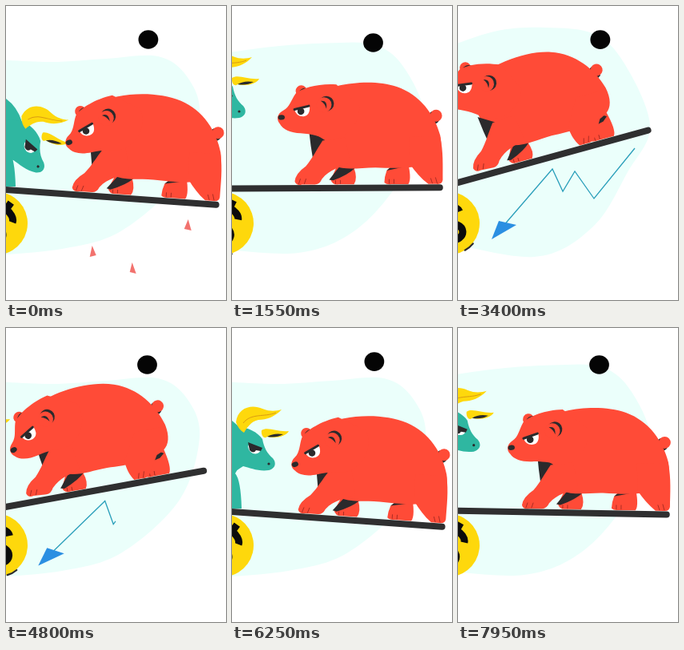
Recreate the animation shown at these times as an HTML page. Size 275 px wide and 368 px high, loop 8 s.

```html
<!DOCTYPE html>
<html lang="en">
<head>
<meta charset="utf-8">
<title>Bear and bull on a seesaw</title>
<style>
  html, body { margin: 0; width: 100%; height: 100%; overflow: hidden; background: #fff; }
  svg { display: block; width: 100vw; height: 100vh; }
  .red { fill: #ff4b37; }
  .ink { fill: #2b2a2c; }
  .teal { fill: #2fb7a1; }
  .gold { fill: #fed80c; }
  .line { fill: none; stroke: #2b2a2c; stroke-linecap: round; }
  .toe { fill: none; stroke: #a32a22; stroke-width: .9; stroke-linecap: round; }
</style>
</head>
<body>
<svg viewBox="0 0 275 368">
  <path id="blob" fill="#ebfffb"/>
  <ellipse id="dot" rx="12.4" ry="11.8" fill="#050505"/>

  <g id="chart">
    <path id="trend" d="M221 178L170 241L146 207L131 232L118 204L50 283" pathLength="1" fill="none" stroke="#2a9fba" stroke-width="1.3"/>
    <path id="tip" d="M42 292L51 269L73 274Z" fill="#2b8fe2"/>
  </g>
  <g id="sparks" fill="#f0504a">
    <path d="M107 300L112 312L104 314Z"/>
    <path d="M157 321L162 335L154 333Z"/>
    <path d="M227 267L231 281L222 279Z"/>
  </g>

  <g id="coin">
    <circle r="39.5" class="gold"/>
    <path class="line" stroke-width="9" d="M16-13C13-24-15-25-16-12C-16 3 17-4 17 12C17 26-14 25-17 13M0-32V-22M0 22V32" style="stroke:#0b0b0b;stroke-linecap:butt"/>
    <path class="line" stroke-width="2.2" d="M28 29Q23 34 17 36"/>
  </g>

  <g id="bull">
    <path class="teal" d="M-60 108L0 116Q14 126 20 145L14 165L4 182Q11 190 12 226H-8L-12 190L-60 200Z"/>
    <g id="bullHead">
      <path class="teal" d="M-20 128L6 124C18 123 32 130 38 139C40 150 44 157 51 163C56 169 54 176 46 178C34 180 22 175 14 173C6 178 0 184 -20 186Z"/>
      <path class="gold" d="M5 118C7 99 25 95 38 101C48 105 55 104 62 102C54 111 43 115 33 115C24 117 19 124 15 131Q8 127 5 118Z"/>
      <path fill="none" stroke="#d99b12" stroke-width="1" d="M14 119C24 106 40 112 55 106"/>
      <path class="gold" d="M37 128C45 123 58 131 71 129C68 135 56 139 44 136C40 140 36 134 37 128Z"/>
      <path class="ink" d="M44 136Q52 131 64 133Q55 138 44 136Z"/>
      <path fill="#fff" d="M20 147L36 152Q34 159 26 157Q20 154 20 147Z"/>
      <path class="ink" d="M20 143L38 150L36 154L30 153Q27 158 22 153Z"/>
      <circle class="ink" cx="46" cy="170" r="1.6"/>
    </g>
  </g>

  <g id="board">
    <g id="bear">
      <g id="ghost" fill="#ffb9b4">
        <ellipse cx="73" cy="221" rx="12" ry="5"/>
        <ellipse cx="188" cy="219" rx="11" ry="7"/>
        <ellipse cx="259" cy="221" rx="13" ry="5"/>
      </g>
      <g id="farHind">
        <path class="red" d="M212 190L194 207Q191 215 191 222Q194 225 200 224H221Q226 217 219 190Z"/>
        <path class="ink" d="M194 207L210 193L219 198L213 203Z"/>
        <path class="toe" d="M197 218V223M203 218V223"/>
      </g>
      <g id="farFore">
        <path class="red" d="M136 192L124 218Q126 225 134 224H153Q158 217 153 203Z"/>
        <path class="ink" d="M122 218L138 198L155 203Q146 212 127 219Z"/>
        <path class="toe" d="M130 219V223M136 219V223"/>
      </g>
      <ellipse class="ink" cx="253" cy="141" rx="7.5" ry="8"/>
      <ellipse class="red" cx="256" cy="138.500" rx="7.500" ry="7.500"/>
      <path class="red" d="M105 112C125 98 175 91 207 102C236 112 254 137 261 163C264 178 261 189 253 194C235 206 205 204 180 203C160 203 145 207 128 201C108 191 99 168 98 145Q94 122 105 112Z"/>
      <g id="hind">
        <path class="red" d="M222 165L261 165C265 183 264 202 264 219Q263 225 256 224H246C237 217 230 209 223 199Z"/>
        <path class="toe" d="M249 217L251 223M255 216L257 223"/>
      </g>
      <path class="ink" d="M97 156Q99 176 102 193Q110 182 121 171Z"/>
      <g id="fore">
        <path class="red" d="M114 169C106 181 102 190 93 201Q80 210 79 220Q81 226 88 224H104Q110 224 113 217C123 205 135 203 149 197L142 165Z"/>
        <path class="toe" d="M86 217L84 223M93 217L91 223"/>
      </g>
      <g id="head">
        <circle class="red" cx="86" cy="108" r="7"/>
        <path class="ink" d="M83 109Q87 103 94 105L92 110Z"/>
        <path class="red" d="M130 101C108 99 88 104 79 111C73 119 71 128 63 132C55 136 54 143 58 148C62 156 72 160 84 161C98 162 108 166 118 169C140 172 160 150 158 128Z"/>
        <circle class="ink" cx="117" cy="124.500" r="9.500"/>
        <circle class="red" cx="114" cy="126" r="9.500"/>
        <path class="ink" d="M110 121Q119 120 117 131Q115 124 110 121Z"/>
        <path fill="#fff" d="M77 131L96 127Q97 139 88 140Q79 140 77 131Z"/>
        <circle class="ink" cx="85" cy="133.500" r="4.300"/>
        <path class="line" stroke-width="3" d="M77 131L95 127"/>
        <ellipse class="ink" cx="60.500" cy="140.500" rx="4.200" ry="3.200"/>
      </g>
    </g>
    <path class="line" stroke-width="8" d="M-300 228.500H260" style="stroke:#2f2f30"/>
  </g>
</svg>
<script>
const LOOP = 8000, CYCLE = 6480, STEP = 50;
const HIGH = 4.1, LOW = -15.4;
const el = {};
document.querySelectorAll('[id]').forEach(n => el[n.id] = n);

const clamp = u => Math.max(0, Math.min(1, u));
const lin = (t, a, b) => clamp((t - a) / (b - a));
const ease = (t, a, b) => { const u = lin(t, a, b); return u * u * (3 - 2 * u); };
const pulse = (t, a, b, c, d) => ease(t, a, b) - ease(t, c, d);
const mix = (a, b, u) => a + (b - a) * u;
const put = (n, v) => n.setAttribute('transform', v);

// Value of a [time, value] track with a straight run between keys
function track(keys, t) {
  let i = 1;
  while (i < keys.length - 1 && t > keys[i][0]) i++;
  const [t0, a] = keys[i - 1], [t1, b] = keys[i];
  return mix(a, b, lin(t, t0, t1));
}

const wide = [[-30, 66], [55, 70], [125, 66], [190, 63], [226, 88], [242, 136], [217, 215], [145, 281], [70, 304], [-30, 313]];
const tall = [[-30, 58], [45, 32], [110, 27], [170, 35], [208, 72], [240, 150], [212, 208], [168, 277], [95, 314], [-30, 292]];

// Smooth curve through the blended outline, closed off stage on the left
function blobPath(k) {
  const p = wide.map(([x, y], i) => [mix(x, tall[i][0], k), mix(y, tall[i][1], k)]);
  const last = p.length - 1, at = i => p[Math.max(0, Math.min(last, i))];
  let d = 'M' + p[0];
  for (let i = 0; i < last; i++) {
    const a = at(i - 1), b = at(i), c = at(i + 1), e = at(i + 2);
    const c1 = b.map((v, j) => v + (c[j] - a[j]) / 6);
    const c2 = c.map((v, j) => v - (e[j] - b[j]) / 6);
    d += `C${c1} ${c2} ${c}`;
  }
  return d + 'Z';
}

const bullX = [[0, 0], [1150, 0], [1468, -26], [1550, -37], [1850, -120], [4450, -130], [4800, -66], [5300, -12], [5700, 0]];
const bullY = [[0, 0], [1150, 0], [1468, -23], [1550, -38], [1850, -70], [4450, -30], [4800, -15], [5700, 0]];

function draw(time) {
  const t = time % CYCLE;

  const wave = .5 * pulse(t, 500, 1500, 1550, 2500) + pulse(t, 2550, 3400, 3500, 4700);
  el.blob.setAttribute('d', blobPath(wave));
  const bob = 2 * Math.PI * time / 3200;
  el.dot.setAttribute('cx', 177.2 + .7 * Math.cos(bob));
  el.dot.setAttribute('cy', 44 - 2 * Math.cos(bob));

  // Seesaw
  const tilt = mix(HIGH, LOW, pulse(t, 1092, 2592, 4300, 5800));
  put(el.board, `rotate(${tilt} -21 275)`);
  put(el.coin, `translate(-12.5 272) rotate(${27 + 2.2 * tilt})`);

  // Bear: slides along the board while the hind legs swap
  const walk = pulse(t, 1450, 3300, 4850, 5850);
  const step = pulse(t, 2400, 3300, 4850, 5850);
  const shear = -.6 * step;
  put(el.bear, `translate(${-38 * walk})`);
  put(el.head, `translate(2 -2) rotate(${42 * pulse(t, 1200, 1900, 4100, 4950) - 22} 130 131)`);
  put(el.fore, `rotate(${4 * step} 128 155)`);
  put(el.hind, `matrix(1 0 ${shear} 1 ${-165 * shear} 0)`);
  put(el.farHind, `translate(${34 * step})`);
  put(el.farFore, `translate(${-4 * step})`);
  el.ghost.setAttribute('opacity', pulse(t, 2350, 2500, 2600, 2750));

  // Bull
  const butt = 1 - ease(t, 600, 1250) + ease(t, 6250, CYCLE);
  put(el.bull, `translate(${track(bullX, t)} ${track(bullY, t)})`);
  put(el.bullHead, `translate(${2 * butt} ${26 * butt}) rotate(${20 * butt} 28 150)`);

  // Falling trend line, swinging with the board
  const from = lin(t, 4400, 5180), to = lin(t, 2100, 2850);
  el.chart.setAttribute('visibility', to > from ? 'visible' : 'hidden');
  el.trend.setAttribute('stroke-dasharray', `0 ${from} ${Math.max(0, to - from)} 2`);
  put(el.chart, `rotate(${tilt - LOW} -21 275)`);
  const grow = pulse(t, 2800, 3000, 5050, 5180);
  put(el.tip, `translate(52 280) scale(${grow}) translate(-52 -280)`);

  const late = t > 3000 ? t - CYCLE : t;
  el.sparks.setAttribute('opacity', .8 * pulse(late, -180, 0, 350, 800));
  put(el.sparks, `translate(0.7 ${-10 * lin(late, 0, 800)})`);
}

let start = null;
function tick(now) {
  if (start === null) start = now;
  const t = (now - start) % LOOP;
  draw(Math.floor(t / STEP) * STEP);
  requestAnimationFrame(tick);
}
draw(0);
requestAnimationFrame(tick);
</script>
</body>
</html>
```
